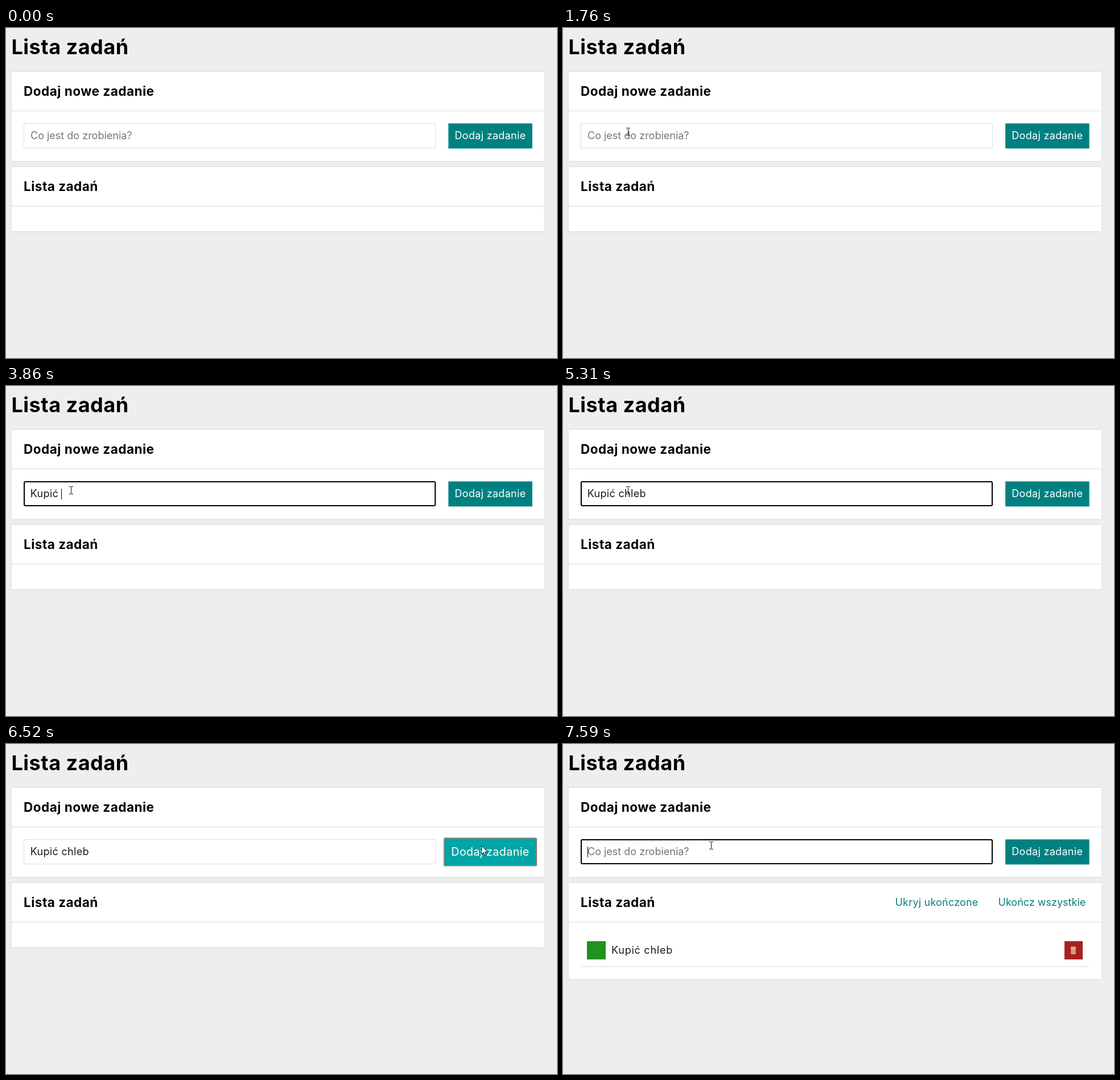
An HTML page with a canvas for the animation above (8 s loop, 968 by 579 pixels).

```html
<!DOCTYPE html>
<html lang="pl">
<head>
<meta charset="utf-8">
<title>Lista zadań</title>
<style>
  html, body { margin: 0; width: 100%; height: 100%; overflow: hidden; background: #eee; }
  canvas { display: block; }
</style>
</head>
<body>
<canvas id="stage" width="968" height="579"></canvas>
<script>
const ctx = document.getElementById('stage').getContext('2d', { alpha: false });

const LOOP = 8000, FADE = 300, BLINK = 515;
const ENTER = 780, FOCUS = 1860, HOVER = 5970, PRESS = 6470, RELEASE = 6540, LEAVE = 7070;
const TASK = 'Kupić chleb';
const INK = '#1a1a1a', LINE = '#ddd', LINK = '#0b7d7d';
const ARROW = new Path2D('M0 0V15L3.4 11.8L5.8 17L8 16L5.8 11L10.4 10.6Z');

const clamp = v => Math.min(1, Math.max(0, v));
const easeOut = power => k => 1 - (1 - k) ** power;
const smooth = k => k * k * (3 - 2 * k);
const bezier = (a, b, s) => 3 * a * s * (1 - s) ** 2 + 3 * b * s * s * (1 - s) + s ** 3;

// The CSS "ease" curve
function ease(v) {
  v = clamp(v);
  let lo = 0, hi = 1;
  for (let i = 0; i < 24; i++) {
    const mid = (lo + hi) / 2;
    if (bezier(0.25, 0.25, mid) < v) lo = mid; else hi = mid;
  }
  return bezier(0.1, 1, lo);
}

const fade = (t, from) => ease((t - from) / FADE);

// Each glide carries the pointer on from where the last one left it
const origin = { x: 218, y: -14 };
const glides = [
  { from: ENTER, to: 1780, x: 114, y: 183, curve: easeOut(1.5) },
  { from: 5690, to: 6070, x: 826, y: 169, curve: easeOut(2) },
  { from: 6070, to: 6300, x: 835, y: 178, curve: easeOut(2) },
  { from: 6965, to: 7390, x: 260, y: 178, curve: smooth }
];

function pointerAt(t) {
  let { x, y } = origin;
  for (const g of glides) {
    const k = g.curve(clamp((t - g.from) / (g.to - g.from)));
    x += (g.x - x) * k;
    y += (g.y - y) * k;
  }
  return [Math.round(x), Math.round(y)];
}

// Two words typed at an even pace, with a pause around the space
function keyTime(i) {
  if (i < 5) return 2690 + 172 * i;
  return i === 5 ? 3860 : 4120 + 168 * (i - 6);
}

function rect(x, y, w, h, color) {
  ctx.fillStyle = color;
  ctx.fillRect(x, y, w, h);
}

function text(str, x, y, color, spacing = 0, size = 18, weight = 400) {
  ctx.font = `${weight} ${size}px Inter, "Open Sans", sans-serif`;
  ctx.letterSpacing = spacing + 'px';
  ctx.fillStyle = color;
  ctx.fillText(str, x, y);
  return ctx.measureText(str).width;
}

function frame(x, y, w, h, color, lineWidth = 1, radius = 0) {
  ctx.strokeStyle = color;
  ctx.lineWidth = lineWidth;
  ctx.beginPath();
  ctx.roundRect(x, y, w, h, radius);
  ctx.stroke();
}

function at(x, y, scale, paint) {
  ctx.save();
  ctx.translate(x, y);
  ctx.scale(scale, scale);
  paint();
  ctx.restore();
}

function panel(y, h, title) {
  ctx.save();
  ctx.shadowColor = '#d6d6d6';
  ctx.shadowBlur = 4;
  rect(10, y, 936, h, '#fff');
  ctx.restore();
  rect(10, y + 68, 936, 1, LINE);
  text(title, 31, y + 41.5, '#000', 0.5, 22.5, 700);
}

function drawInput(t) {
  const focused = (t >= FOCUS && t < PRESS) || t >= RELEASE;
  if (focused) frame(32, 168, 722, 42, '#000', 2, 2);
  else frame(31.5, 167.5, 723, 43, LINE);

  let typed = 0;
  while (t < RELEASE && typed < TASK.length && keyTime(typed) <= t) typed++;
  let width = 0;
  if (typed) width = text(TASK.slice(0, typed), 42.8, 195, INK, 0.3);
  else text('Co jest do zrobienia?', 43, 195, '#757575');

  const lastEdit = t >= RELEASE ? RELEASE : typed ? keyTime(typed - 1) : FOCUS;
  if (focused && Math.floor((t - lastEdit) / BLINK) % 2 === 0)
    rect(Math.round(42.8 + width), 180, 1, 19, '#000');
}

function drawButton(t) {
  const hover = fade(t, HOVER) - fade(t, LEAVE);
  const peak = fade(RELEASE, PRESS);
  const press = t < RELEASE
    ? fade(t, PRESS)
    : peak * (1 - ease((t - RELEASE) / (FADE * peak)));
  const tone = Math.round(128 + 25 * hover + 51 * press);

  at(850.9, 189.4, 1 + 0.1 * hover, () => {
    rect(-73.7, -22, 147.4, 44, `rgb(0 ${tone} ${tone})`);
    if (t >= PRESS && t < RELEASE) frame(-73.7, -22, 147.4, 44, '#858585', 1.8, 2);
    text('Dodaj zadanie', -62.6, 5.7, '#fff', 0.3);
  });
}

function drawBin() {
  const wood = '#e3c797', slat = '#a3633f';
  rect(-4, -5, 8, 11.5, wood);
  ctx.beginPath();
  ctx.ellipse(0, -5, 4.8, 1.7, 0, 0, 7);
  ctx.fill();
  for (let x = -2; x <= 2; x += 2) rect(x - 0.4, -2.5, 0.8, 7.5, slat);
  rect(-3, -5.3, 6, 0.8, slat);
}

function drawTask() {
  text('Ukryj ukończone', 583.5, 283.5, LINK, 0.2);
  text('Ukończ wszystkie', 764.5, 283.5, LINK);
  rect(42, 346, 33, 32, '#1f921f');
  text(TASK, 85, 368, INK, 0.75);
  rect(881, 346, 32, 32, '#a82022');
  at(896.5, 362, 1, drawBin);
  rect(31, 390, 893, 1, LINE);
}

function drawBeam() {
  rect(0, -6, 1, 12, '#111');
  for (const y of [-7, 6]) {
    rect(-3, y, 3, 1, '#111');
    rect(1, y, 3, 1, '#111');
  }
}

function drawArrow() {
  ctx.translate(0.5, 0.5);
  ctx.fillStyle = '#fff';
  ctx.fill(ARROW);
  ctx.strokeStyle = '#111';
  ctx.lineWidth = 1;
  ctx.stroke(ARROW);
}

function drawPointer(t) {
  if (t < ENTER) return;
  const [x, y] = pointerAt(t);
  const inside = (left, top, right, bottom) => x >= left && x < right && y >= top && y < bottom;
  const overText = inside(31, 167, 755, 211) || inside(10, 11, 215, 55) || inside(31, 97, 263, 125);
  at(x, y, 1, overText ? drawBeam : drawArrow);
}

function draw(t) {
  const added = t >= RELEASE;
  rect(0, 0, 968, 579, '#eee');
  text('Lista zadań', 9.5, 46, '#000', 0.5, 36, 700);
  panel(77, 156, 'Dodaj nowe zadanie');
  panel(244, added ? 168.5 : 112.5, 'Lista zadań');
  drawInput(t);
  drawButton(t);
  if (added) drawTask();
  drawPointer(t);
}

const start = performance.now();
function tick() {
  draw((performance.now() - start) % LOOP);
  requestAnimationFrame(tick);
}
tick();
</script>
</body>
</html>
```
